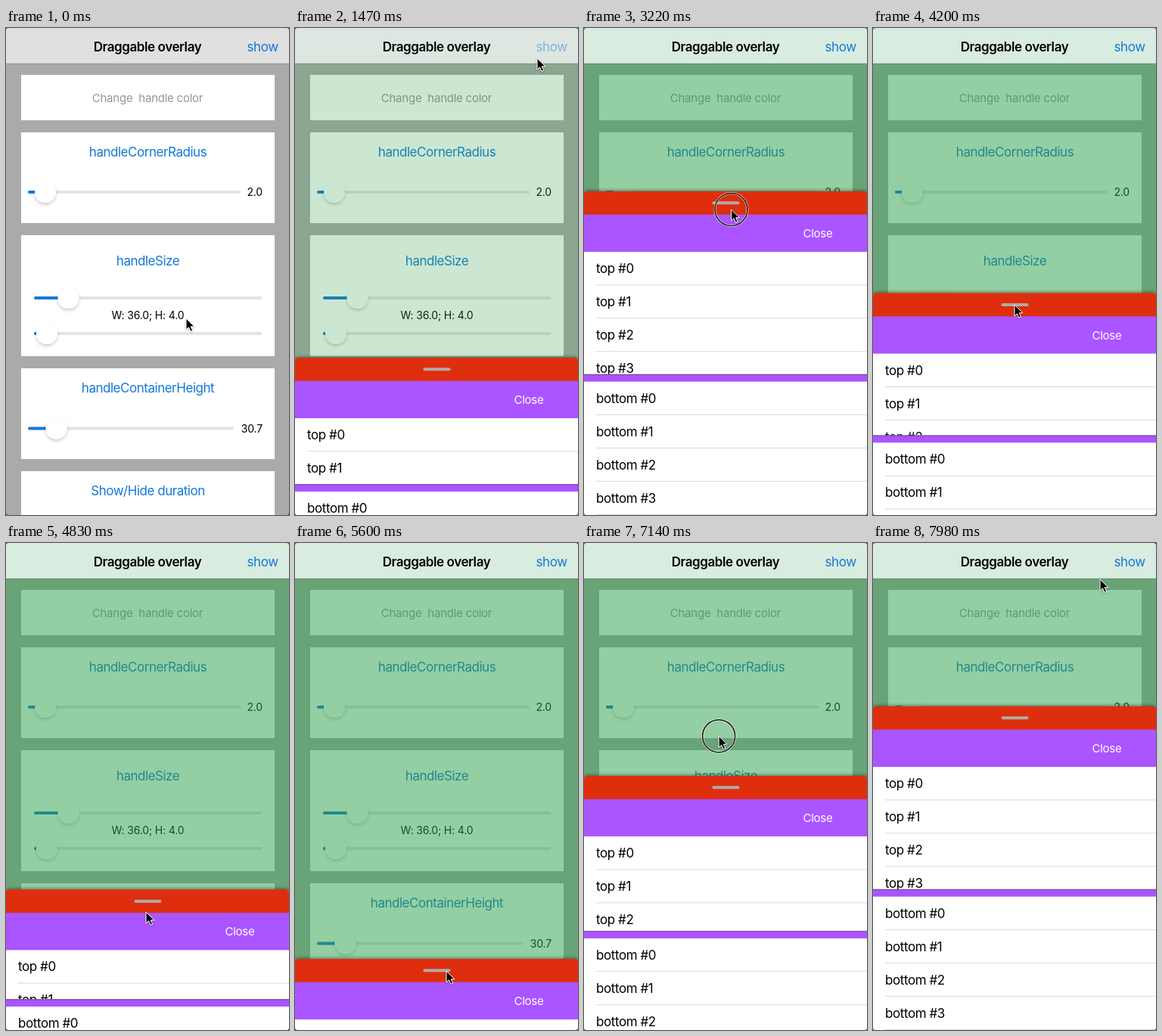
An HTML page that plays this animation: 374x644 px, repeating every 8000 ms.

```html
<!DOCTYPE html>
<html lang="en">
<head>
<meta charset="utf-8">
<title>Draggable overlay</title>
<style>
  html, body { margin: 0; width: 100%; height: 100%; overflow: hidden; background: #555; }
  svg { display: block; width: 374px; height: 644px; border-radius: 4px; }
  text { font-family: Inter, Roboto, "Liberation Sans", sans-serif; font-size: 17px; letter-spacing: -.42px; white-space: pre; }
  .blue { fill: #1478d8; }
  .mid { text-anchor: middle; }
  .blue.mid { letter-spacing: -.48px; }
  .small { font-size: 15px; letter-spacing: -.24px; }
  .value { font-size: 14px; letter-spacing: -.15px; }
  .title { font-weight: 600; }
</style>
</head>
<body>
<svg viewBox="0 0 374 644">
  <defs>
    <filter id="thumbShadow" x="-50%" y="-50%" width="200%" height="200%">
      <feDropShadow dx="0" dy="2.5" stdDeviation="2" flood-opacity=".2"/>
    </filter>
    <filter id="sheetShadow" x="-5%" y="-5%" width="110%" height="110%">
      <feDropShadow dx="0" dy="-1" stdDeviation="2" flood-opacity=".45"/>
    </filter>
    <filter id="arrowShadow" x="-50%" y="-50%" width="200%" height="200%">
      <feDropShadow dx="0" dy="1" stdDeviation="1" flood-opacity=".35"/>
    </filter>
    <clipPath id="topClip"><rect id="topArea" width="374" height="162"/></clipPath>
  </defs>
  <rect width="374" height="644" fill="#aaa"/>
  <g id="page"></g>
  <rect id="dim" width="374" height="644" fill="#2a9e48"/>

  <rect id="bar" width="374" height="47"/>
  <rect y="46.5" width="374" height="1" fill="#000" opacity=".18"/>
  <text class="mid title" x="187" y="31">Draggable overlay</text>
  <text id="show" class="blue" x="318.5" y="31">show</text>

  <g id="sheet">
    <path d="M0 660V5Q0 0 5 0H369Q374 0 374 5V660Z" fill="#de2d09" filter="url(#sheetShadow)"/>
    <rect x="169.5" y="13.3" width="36" height="4" rx="2" fill="#b1aaa7"/>
    <rect y="30.7" width="374" height="50" fill="#aa55ff"/>
    <text class="small" x="289.5" y="61" fill="#fff">Close</text>
    <g transform="translate(0 80)">
      <rect width="374" height="600" fill="#fff"/>
      <g id="topList" clip-path="url(#topClip)"></g>
    </g>
  </g>
  <g id="lower">
    <rect width="374" height="10" fill="#aa55ff"/>
    <rect y="-.5" width="374" height="1.5" fill="#6c4a8c" opacity=".8"/>
    <rect y="9.5" width="374" height="400" fill="#fff"/>
    <g id="bottomList" transform="translate(0 9.5)"></g>
  </g>

  <g id="cursor">
    <g id="ring" fill="none">
      <circle r="21.5" stroke="#fff" stroke-width="3" opacity=".75"/>
      <circle r="21.5" stroke="#111" stroke-width="1.5"/>
    </g>
    <path d="M0 0V15L3.5 11.8L6 17.3L8.6 16.1L6.2 10.8H11Z" stroke="#fff" filter="url(#arrowShadow)"/>
  </g>
</svg>
<script>
const $ = id => document.getElementById(id);
const LOOP = 8000, STEP = 70, H = 644, OPEN = 216, HALF = 350.6, LOW = 550;

const card = (y, h) => `<rect x="20" y="${y}" width="335" height="${h}" fill="#fff"/>`;
const label = (y, s, cls = 'blue') => `<text class="mid ${cls}" x="187.5" y="${y}">${s}</text>`;
const value = (y, s) => `<text class="value" text-anchor="end" x="339" y="${y}">${s}</text>`;
const slider = (x, end, y, knob) =>
  `<rect x="${x}" y="${y - 2}" width="${end - x}" height="4" rx="2" fill="#e4e4e4"/>
   <rect x="${x}" y="${y - 2}" width="${knob - x}" height="4" rx="2" fill="#1478d8"/>
   <circle cx="${knob}" cy="${y}" r="14" fill="#fff" filter="url(#thumbShadow)"/>`;

$('page').innerHTML =
  card(62, 60) + `<text class="mid small" x="187" y="97.5" fill="#979797">Change  handle color</text>` +
  card(138, 120) + label(170, 'handleCornerRadius') + slider(29, 310, 217, 52) + value(222, '2.0') +
  card(274, 160) + label(313.5, 'handleSize') + slider(37, 338.5, 357, 82.5) +
  label(385, 'W: 36.0; H: 4.0', 'value') + slider(37, 338.5, 404, 54) +
  card(450, 120) + label(482, 'handleContainerHeight') + slider(29, 301.5, 529.5, 66.5) + value(534.5, '30.7') +
  card(586, 120) + label(618, 'Show/Hide duration');

const rows = name => Array.from({ length: 6 }, (_, i) =>
  `<text x="16" y="${44 * i + 28}">${name} #${i}</text>
   <rect x="16" y="${44 * i + 43.3}" width="358" height="1" fill="#d9d9dc"/>`).join('');
$('topList').innerHTML = rows('top');
$('bottomList').innerHTML = rows('bottom');

// Each move eases from the place before it: start, end, x, y, pressed
const pointerMoves = [
  [0, 840, 338, 28],
  [1120, 1340, 338, 28, true],
  [1340, 1470, 320, 40],
  [1470, 1960, 204, 232],
  [2170, 2660, 266, 167],
  [2800, 3220, 194.5, 240],
  [3220, 3780, 187, 366, true],
  [4340, 4760, 185, 488, true],
  [4900, 5600, 200, 566],
  [5740, 6230, 218.5, 403.5, true],
  [6230, 6580, 204, 365, true],
  [6860, 7490, 142, 102, true],
  [7630, 7980, 300, 48]
];
// Start, end, top edge
const sheetMoves = [
  [3290, 3920, HALF],
  [4340, 5270, LOW],
  [5880, 6434, HALF],
  [6930, 7490, OPEN]
];

const mix = (a, b, k) => a + (b - a) * k;
const progress = (t, a, b) => Math.min(1, Math.max(0, (t - a) / (b - a)));
const ease = k => k * k * (3 - 2 * k);
const follow = (moves, t, from) => moves.reduce((pos, [a, b, ...to]) =>
  pos.map((v, i) => mix(v, to[i], ease(progress(t, a, b)))), from);
const place = (id, x, y) => $(id).setAttribute('transform', `translate(${x} ${y})`);
const toggle = (id, on) => { $(id).style.display = on ? '' : 'none'; };

function draw(t) {
  const p = ease(progress(t, 1313, 1633));
  const [rest] = follow(sheetMoves, t, [OPEN]);
  const top = mix(H, rest, p);
  const split = mix(741, .6 * rest + 328.5, p);

  $('dim').setAttribute('opacity', p / 2);
  $('bar').setAttribute('fill', `rgb(${mix(224, 217, p)},${mix(224, 236, p)},224)`);
  $('show').setAttribute('opacity', t < 1190 ? 1 : mix(.25, 1, progress(t, 1360, 1780)));
  toggle('sheet', p > 0);
  toggle('lower', p > 0);
  place('sheet', 0, top);
  place('lower', 0, split);
  $('topArea').setAttribute('height', Math.max(0, split - top - 80));

  place('cursor', ...follow(pointerMoves, t, [238, 384]));
  toggle('ring', pointerMoves.some(([a, b, , , pressed]) => pressed && t >= a && t < b));
}

const begin = performance.now();
function tick() {
  const t = (performance.now() - begin) % LOOP;
  draw(Math.floor(t / STEP) * STEP);
  requestAnimationFrame(tick);
}
tick();
</script>
</body>
</html>
```
